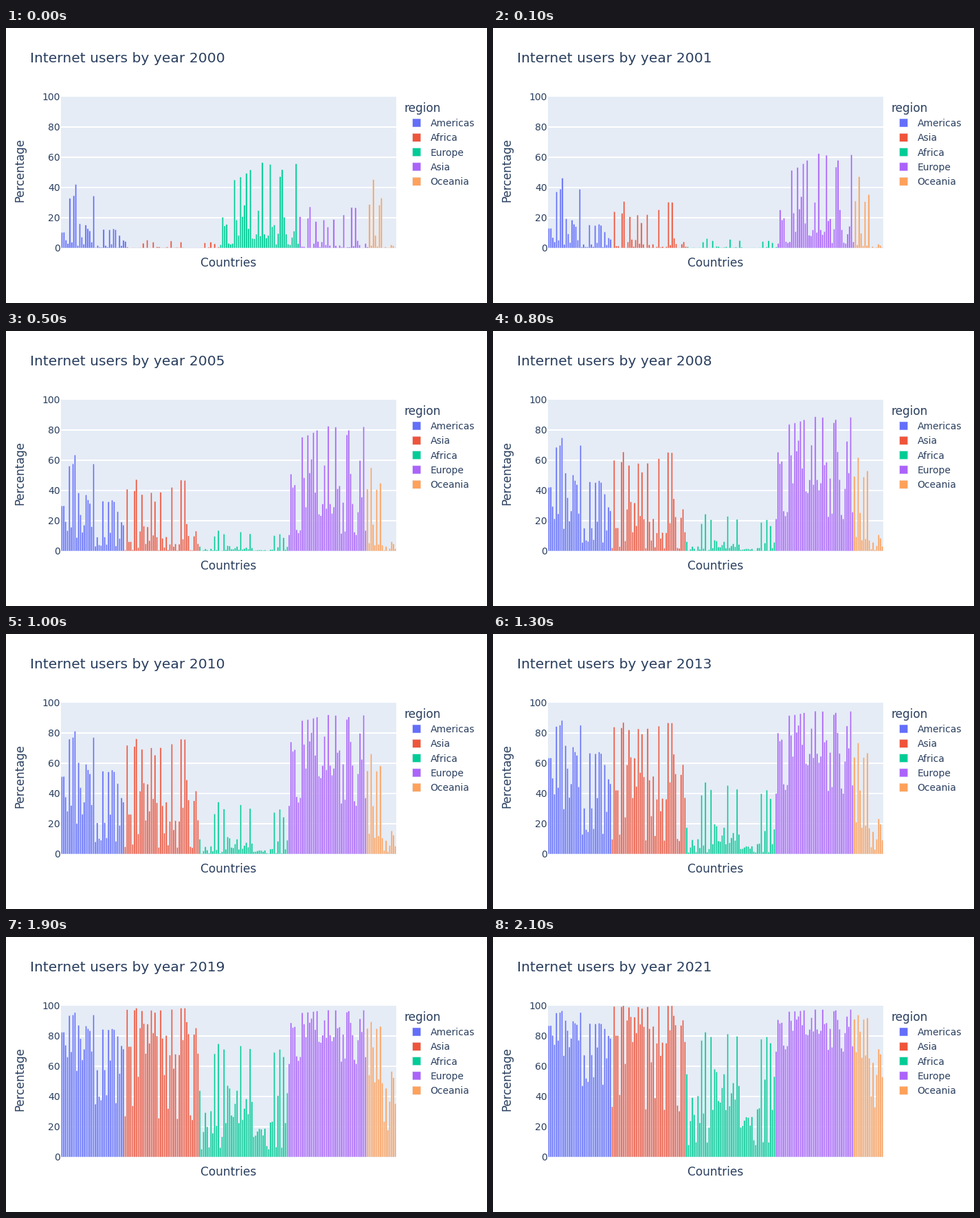
A matplotlib script that plays this animation: 700x400 px, repeating every 2.2 s.

```python
import numpy as np
import matplotlib.pyplot as plt
from matplotlib.animation import FuncAnimation
from matplotlib.collections import PolyCollection
from matplotlib.patches import Rectangle

W, H, DPI = 700, 400, 100
PX = 72 / DPI
LEFT, RIGHT, TOP, BOTTOM = 80, 568, 100, 320
INK, PANEL = "#2a3f5f", "#e5ecf6"
COLORS = ["#636efa", "#ef553b", "#00cc96", "#ab63fa", "#ffa15a"]
START, YEARS = 2000, 22
CEILING = 104  # level at which the growth curves flatten out
KNOTS = [2000, 2005, 2010, 2016, 2021]
rng = np.random.default_rng(5)


class Region:
    """Countries scattered around a regional S-curve, with some leaders
    and laggards; `typical` and `spread` are given at the KNOTS years."""

    def __init__(self, name, size, typical, spread, leaders, laggards, joins):
        self.name = name
        typical = np.array(typical)
        self.mid = np.log(typical / (CEILING - typical))
        self.spread = spread
        self.rank = rng.uniform(-0.8, 0.8, size)
        self.rank[leaders] = rng.uniform(1.3, 1.7, len(leaders))
        self.rank[laggards] = rng.uniform(-1.7, -1.3, len(laggards))
        self.since = np.full(size, START)
        for year, members in joins.items():
            self.since[members] = year

    def levels(self, year):
        mid = np.interp(year, KNOTS, self.mid)
        spread = np.interp(year, KNOTS, self.spread)
        v = CEILING / (1 + np.exp(-(mid + spread * self.rank)))
        return np.minimum(v, 100)[self.since <= year]


americas = Region("Americas", 34, [5, 19, 37, 62, 80],
                  [1.6, 1.2, 1.15, 1.1, 0.85],
                  [4, 6, 7, 17], [18, 20, 21, 24, 29], {2004: [12]})
asia = Region("Asia", 40, [0.9, 6, 26, 60, 80],
              [2.2, 1.55, 1.25, 1.15, 1.25],
              [1, 5, 6, 9, 14, 16, 19, 25, 30, 32],
              [0, 4, 18, 23, 28, 35, 36],
              {2001: [0, 23, 28, 37], 2002: [13]})
africa = Region("Africa", 48, [0.2, 1.3, 4.5, 17, 38],
                [2, 1.5, 1.45, 1.2, 1.15],
                [8, 10, 13, 22, 27, 40, 43, 45],
                [1, 5, 11, 36, 37, 41, 44], {2004: [37]})
europe = Region("Europe", 42, [14, 41, 67, 80, 88],
                [1.2, 1.05, 0.85, 0.8, 0.6],
                [7, 10, 13, 15, 21, 25, 31, 32, 40],
                [0, 4, 5, 6, 28, 30, 35, 36, 41], {2004: [30, 38]})
oceania = Region("Oceania", 16, [1.7, 5.5, 14, 32, 70],
                 [2.3, 1.8, 1.45, 1.2, 0.9],
                 [0, 2, 5, 7], [9, 11], {2001: [6], 2002: [8]})


def region_order(year):
    if year == START:
        return [americas, africa, europe, asia, oceania]
    return [americas, asia, africa, europe, oceania]


plt.rcParams["font.family"] = "DejaVu Sans"
fig = plt.figure(figsize=(W / DPI, H / DPI), dpi=DPI, facecolor="white")
ax = fig.add_axes([0, 0, 1, 1])
ax.set(xlim=(0, W), ylim=(H, 0))
ax.axis("off")


def label(x, y, text, size, **kw):
    return ax.text(x, y, text, fontsize=size * PX, color=INK,
                   va="baseline", **kw)


def y_of(v):
    return BOTTOM - v * (BOTTOM - TOP) / 100


ax.add_patch(Rectangle((LEFT, TOP), RIGHT - LEFT, BOTTOM - TOP,
                       fc=PANEL, lw=0, zorder=0))
for tick in range(0, 101, 20):
    y = y_of(tick)
    if 0 < tick < 100:
        ax.plot([LEFT, RIGHT], [y, y], color="white", lw=2 * PX, zorder=1,
                solid_capstyle="butt")
    label(79, y + 5, str(tick), 14, ha="right")

title = label(35, 50, "", 20.3)
label(324, 347, "Countries", 17, ha="center")
label(25, 207, "Percentage", 16.5, ha="center", rotation=90,
      rotation_mode="anchor")
label(579.5, 122, "region", 17)

edge = dict(linewidth=0.5 * PX, edgecolor=PANEL, snap=False)
bars, names = [], []
for i, color in enumerate(COLORS):
    y = 138 + 21.3 * i
    ax.add_patch(Rectangle((591.7, y - 6), 12, 12, facecolor=color, **edge))
    names.append(label(617.5, y + 5, "", 13.9))
    group = PolyCollection([], facecolor=color, zorder=2, **edge)
    ax.add_collection(group, autolim=False)
    bars.append(group)


def update(frame):
    year = START + frame
    title.set_text(f"Internet users by year {year}")
    order = region_order(year)
    levels = [r.levels(year) for r in order]
    pitch = (RIGHT - LEFT) / sum(map(len, levels))
    x = LEFT + 0.1 * pitch
    for region, vals, group, name in zip(order, levels, bars, names):
        name.set_text(region.name)
        x0 = x + pitch * np.arange(len(vals))
        x1, top = x0 + 0.8 * pitch, y_of(vals)
        base = np.full(len(vals), BOTTOM)
        corners = [(x0, base), (x0, top), (x1, top), (x1, base)]
        group.set_verts(np.array(corners).transpose(2, 0, 1))
        x += pitch * len(vals)
    return [title, *names, *bars]


anim = FuncAnimation(fig, update, frames=YEARS, interval=100, repeat=True,
                     repeat_delay=0, blit=False)
plt.show()
```
